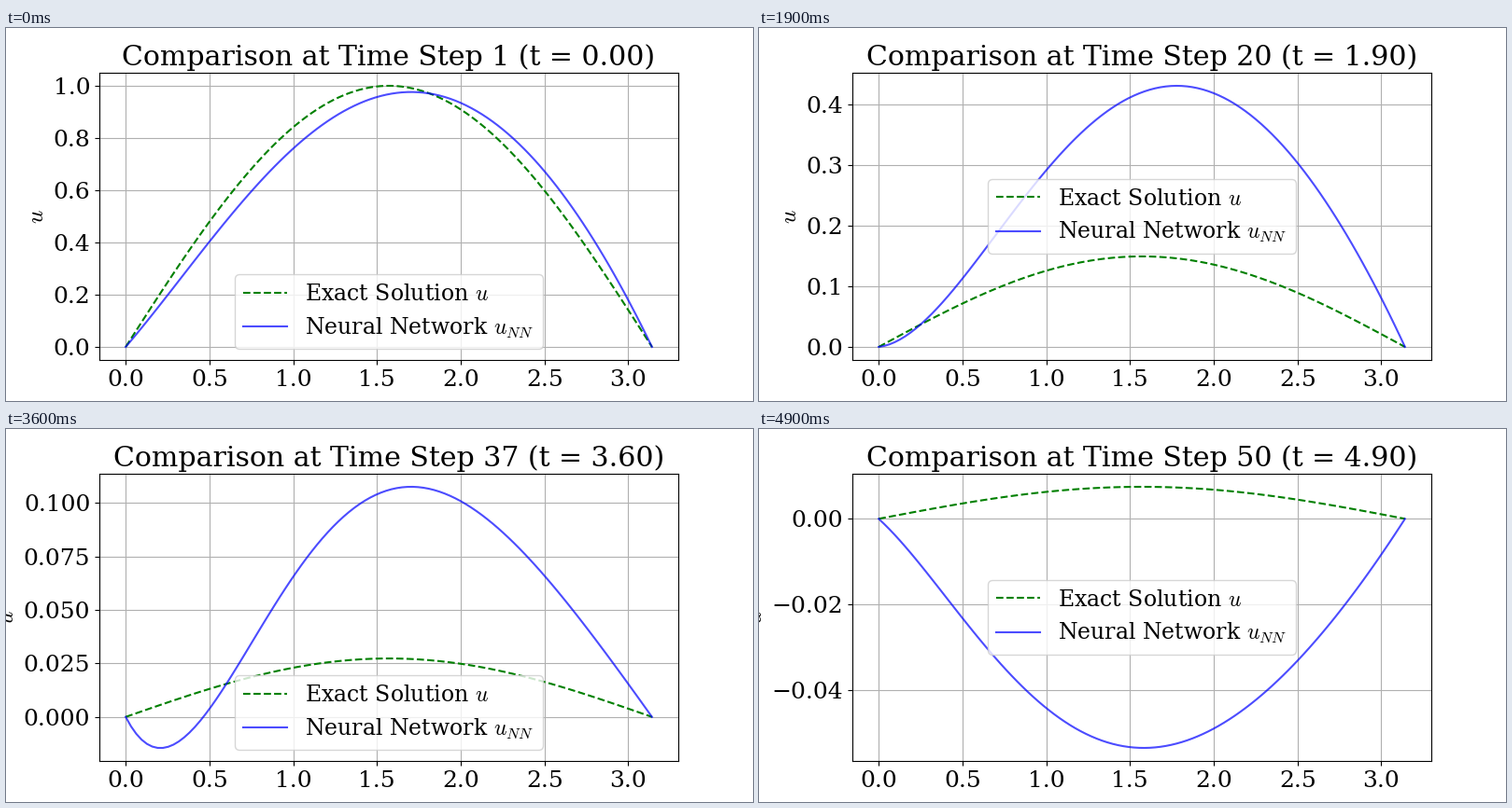
A matplotlib script that plays this animation: 800 px wide and 400 px high, repeating every 5000 ms.

```python
import numpy as np
import matplotlib.pyplot as plt
from matplotlib.animation import FuncAnimation

plt.rcParams.update({
    "font.family": "DejaVu Serif",
    "font.size": 18,
    "mathtext.fontset": "cm",
})

STEPS = 50
DT = 0.1
x = np.linspace(0, np.pi, 100)
z = 1 - x / np.pi


def bump(t, center, width):
    return np.exp(-((t - center) / width) ** 2)


def exact(t):
    return np.exp(-t) * np.sin(x)


def network(t):
    """A parabola x (pi - x) times a profile set by its left, middle and right values."""
    left = 0.238 * bump(t, 0, 1.1) - 0.043 * bump(t, 3.6, 0.62) - 0.00045 * t**2
    middle = 0.3923 - 0.13371 * t + 0.00558 * t**2 + 0.002302 * t**3 - 0.0002837 * t**4
    right = 0.422 - 0.128 * t + 0.00158 * t**3
    power = 3.3 + 0.7 * np.tanh(t - 2.3)

    # Solve right + slope * z - bend * z**power for the three values.
    half = 0.5 ** power
    slope = (middle - right + half * (right - left)) / (0.5 - half)
    bend = slope + right - left
    return x * (np.pi - x) * (right + slope * z - bend * z**power)


def legend_place(curves):
    """Lower or middle of the axes, whichever hides fewer curve points."""
    low, high = ax.get_ylim()
    central = (x > 0.65) & (x < 2.5)
    heights = (np.array(curves)[:, central] - low) / (high - low)

    def hidden(center):
        return np.sum(np.abs(heights - center) < 0.125)

    return "center" if hidden(0.5) < hidden(0.165) else "lower center"


fig, ax = plt.subplots(figsize=(8, 4), dpi=100)


def update(i):
    t = i * DT
    curves = exact(t), network(t)
    ax.clear()
    ax.plot(x, curves[0], "g--", label="Exact Solution $u$")
    ax.plot(x, curves[1], "b-", alpha=0.7, label="Neural Network $u_{NN}$")
    ax.set_title(f"Comparison at Time Step {i + 1} (t = {t:.2f})")
    ax.set_ylabel("$u$")
    ax.legend(loc=legend_place(curves), fontsize=17)
    ax.grid(True)


anim = FuncAnimation(fig, update, frames=STEPS, interval=100, repeat=True)
plt.show()
```
